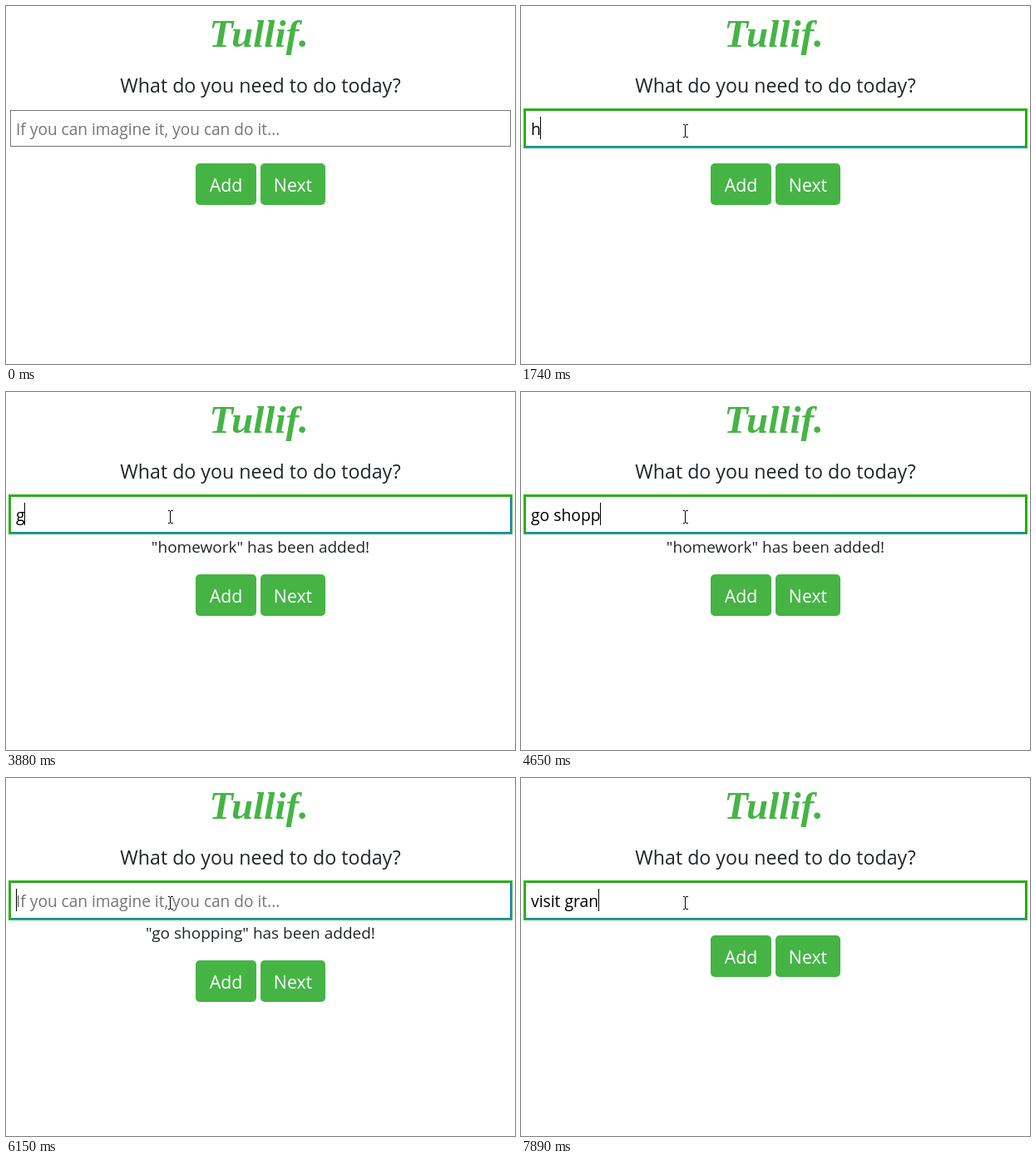
Recreate the animation shown at these times as an HTML page. Size 612 px wide and 430 px high, loop 7.99 s.

```html
<!DOCTYPE html>
<html lang="en">
<head>
<meta charset="utf-8">
<title>To-do</title>
<style>
  html, body { margin: 0; width: 100%; height: 100%; overflow: hidden; background: #fff; }
  svg { display: block; width: 612px; height: 430px; }
  text { font-family: "Open Sans", "Noto Sans", sans-serif; fill: #212529; white-space: pre; }
  .middle { text-anchor: middle; }
  .brand { font: italic bold 47px "Liberation Serif", serif; fill: #45b445; }
  .button rect { fill: #45b445; }
  .button text { font-size: 21.3px; fill: #fff; }
  #hint { font-size: 19.1px; fill: #757575; }
  #entry { font-size: 19.3px; fill: #000; }
</style>
</head>
<body>
<svg viewBox="0 0 612 430">
  <text class="brand middle" x="304" y="49">Tullif.</text>
  <text class="middle" x="306" y="104" font-size="23.2">What do you need to do today?</text>

  <rect id="border" x="5.5" y="125.5" width="601" height="43" fill="none"/>
  <g id="focus" fill="none">
    <rect x="4" y="124" width="604" height="46" stroke="#2db31b" stroke-width="2"/>
    <path d="M5.5 169V125.5H607" stroke="#27a818"/>
    <path d="M6 168.5H606.5V126" stroke="#0b78d0"/>
  </g>
  <text id="hint" x="12" y="155">If you can imagine it, you can do it...</text>
  <text id="entry" x="12" y="155"></text>
  <rect id="caret" y="133" width="1" height="27"/>

  <text id="message" class="middle" x="306" y="193" font-size="19"></text>
  <g id="buttons">
    <g class="button"><rect x="228" y="189" width="73" height="50" rx="5"/><text class="middle" x="264.5" y="223">Add</text></g>
    <g class="button"><rect x="306" y="189" width="78" height="50" rx="5"/><text class="middle" x="345" y="223">Next</text></g>
  </g>

  <path id="arrow" d="M.5 .5V16.5L4.2 13L6.7 18.5L9 17.5L6.6 12H11.5Z" fill="#fff" stroke="#000"/>
  <path id="beam" d="M-2.5 -7.5H-.5M.5 -7.5H3.5M0 -7V7M-2.5 7.5H-.5M.5 7.5H3.5" fill="none" stroke="#000"/>
</svg>
<script>
const LOOP = 7990;
const $ = id => document.getElementById(id);
const show = (id, visible) => $(id).setAttribute('visibility', visible ? 'visible' : 'hidden');

// One keystroke per time; each shows one more character.
const typed = (word, times, prefix = '') =>
  times.map((at, i) => ({ at, text: prefix + word.slice(0, i + 1), caret: true }));
const blink = (at, caret, text = '') => ({ at, text, caret });

const entries = [
  blink(0, false),
  blink(1000, true), blink(1460, false),
  ...typed('homework', [1740, 1840, 1920, 2020, 2200, 2280, 2360, 2440]),
  blink(2530, false, 'homework'),
  blink(2760, true), blink(2990, false), blink(3500, true),
  ...typed('go shopping', [3880, 3960, 4090, 4190, 4340, 4400, 4470, 4620, 4700, 4840, 4930]),
  blink(5130, false, 'go shopping'),
  blink(5210, true), blink(5670, false), blink(6150, true),
  ...typed('visit ', [6460, 6610, 6690, 6790, 6890, 6970]),
  blink(7200, false, 'visit '),
  ...typed('gran', [7430, 7580, 7680, 7790], 'visit ')
];

const messages = [
  { from: 2760, to: 4770, item: 'homework' },
  { from: 5210, to: 7200, item: 'go shopping' }
];

const MOVE = { start: 260, end: 770, steps: 10, from: [212, 409], to: [197, 150] };

function pointerAt(t) {
  const p = Math.min(1, (t - MOVE.start) / (MOVE.end - MOVE.start));
  const q = Math.floor(p * MOVE.steps + 1e-6) / MOVE.steps;
  const ease = q * q * (3 - 2 * q);
  return MOVE.from.map((a, i) => Math.round(a + (MOVE.to[i] - a) * ease));
}

function drawPointer(t) {
  const [x, y] = pointerAt(Math.max(t, MOVE.start));
  const visible = t >= MOVE.start;
  const hover = visible && y < 169;
  show('arrow', visible && !hover);
  show('beam', hover);
  $('arrow').setAttribute('transform', `translate(${x} ${y})`);
  $('beam').setAttribute('transform', `translate(${x + .5} ${y})`);
  $('border').setAttribute('stroke', hover ? '#4f4f4f' : '#767676');
}

function drawField(t) {
  const focus = t < 920 ? 0 : Math.min(3, 1 + Math.floor((t - 920) / 40)) / 3;
  $('focus').setAttribute('opacity', focus);
  const state = entries.findLast(e => e.at <= t);
  $('entry').textContent = state.text;
  show('hint', !state.text);
  show('caret', state.caret);
  const width = state.text ? $('entry').getComputedTextLength() : 0;
  $('caret').setAttribute('x', Math.floor(12 + width));
}

function drawMessage(t) {
  const message = messages.find(m => t >= m.from && t < m.to);
  $('message').textContent = message ? `"${message.item}" has been added!` : '';
  $('buttons').setAttribute('transform', `translate(0 ${message ? 30 : 0})`);
}

function render(t) {
  drawPointer(t);
  drawField(t);
  drawMessage(t);
}

function tick() {
  render(performance.now() % LOOP);
  requestAnimationFrame(tick);
}
tick();
</script>
</body>
</html>
```
